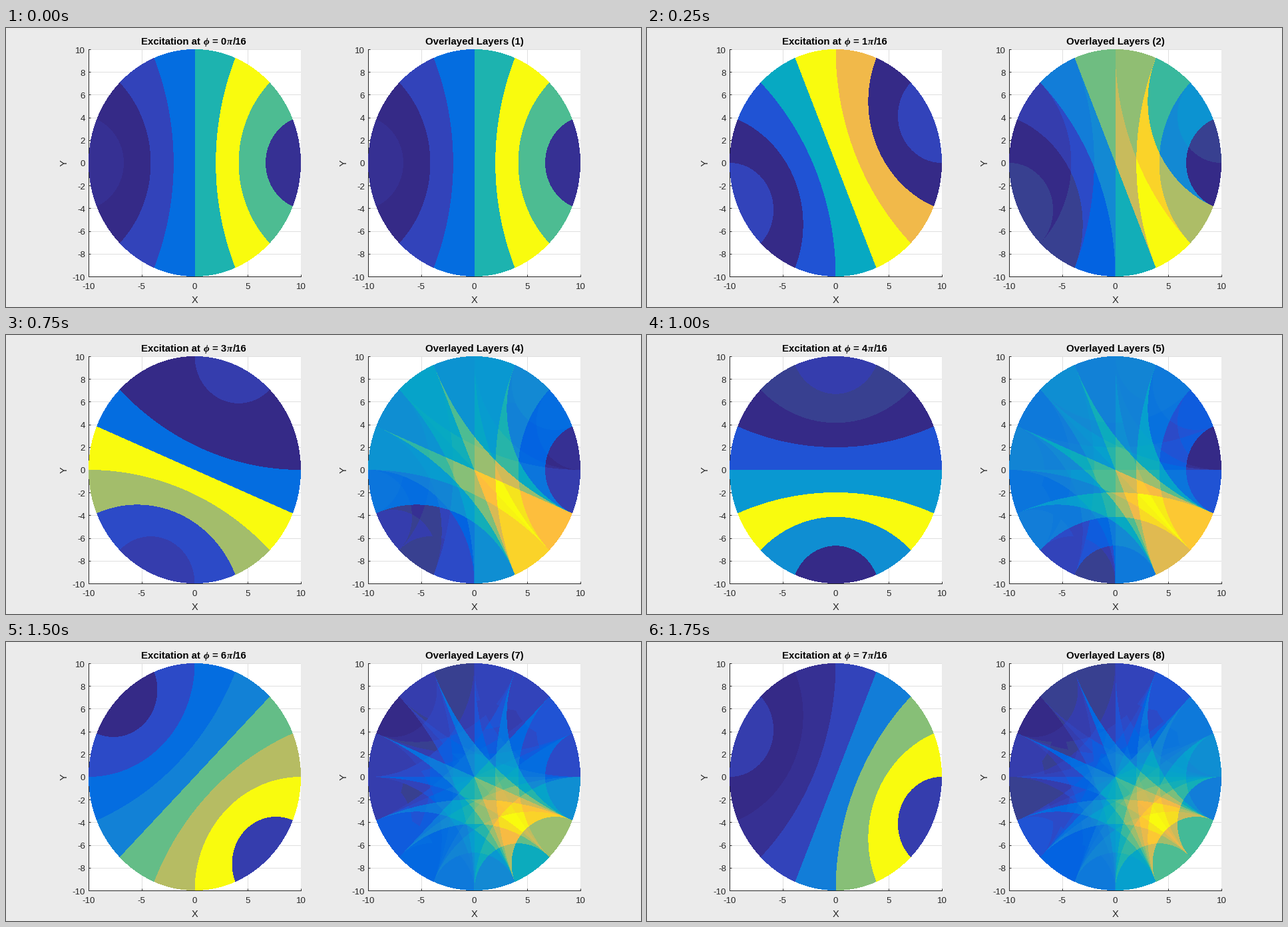
Animation, 954 px wide and 420 px high, one loop 3.5 s. Source, as a matplotlib script:

```python
import numpy as np
import matplotlib.pyplot as plt
from matplotlib.animation import FuncAnimation
from matplotlib.colors import to_rgb

W, H, DPI = 954, 420, 96
LEFTS = (124, 544)
TOP, AX_W, AX_H = 32, 319, 342
R = 10
INK = (0.15, 0.15, 0.15)

# Colour stops of a 64-step map
STOPS = {0: "#352a87", 1: "#363093", 2: "#384090", 3: "#353dad", 4: "#3243ba",
         5: "#2c4ac7", 6: "#2053d4", 7: "#0f5cdd", 8: "#0363e1", 10: "#046de0",
         14: "#127dd8", 17: "#1389d3", 20: "#0998d1", 22: "#06a0cd",
         25: "#07a9c2", 29: "#1db3af", 34: "#4dbc92", 39: "#87bf77",
         45: "#c0bc60", 51: "#f1b94a", 53: "#fdbe3d", 56: "#fcce2e",
         60: "#f5e41d", 63: "#f9fb0e"}
PALETTE = np.column_stack([np.interp(range(64), list(STOPS), channel)
                           for channel in zip(*map(to_rgb, STOPS.values()))])

# Level of each of the eight bands, counted from the driving electrode
LEVELS = np.array([
    [1, 34, 63, 29, 10, 4, 0, 1],
    [4, 0, 51, 63, 25, 6, 0, 4],
    [5, 0, 5, 63, 57, 14, 2, 5],
    [3, 0, 0, 10, 63, 42, 5, 3],
    [3, 2, 0, 6, 20, 63, 18, 0],
    [1, 0, 5, 10, 20, 42, 63, 1],
    [0, 5, 10, 15, 36, 44, 63, 3],
    [3, 0, 1, 4, 14, 39, 63, 3],
])
WEIGHTS = [1, 1, 1, 1, 1, 1, 1.8, 1.8]

xs = (np.arange(AX_W) + 0.5) / AX_W * 2 * R - R
ys = R - (np.arange(AX_H) + 0.5) / AX_H * 2 * R
Z = xs[None, :] + 1j * ys[:, None]
INSIDE = np.abs(Z) <= R


def layer(n):
    """Bands between circular equipotentials of two opposite electrodes."""
    pole = R * np.exp(1j * n * np.pi / 8)
    angle = 2 * np.arctan2(np.abs(Z - pole), np.abs(Z + pole))
    band = np.clip((angle / (np.pi / 8)).astype(int), 0, 7)
    return LEVELS[n][band].astype(float)


def colourise(field):
    lo, hi = field[INSIDE].min(), field[INSIDE].max()
    step = np.clip((field - lo) / (hi - lo) * 64, 0, 63).astype(int)
    return np.dstack([PALETTE[step], INSIDE])


layers = [layer(n) for n in range(8)]
totals = np.cumsum([w * f for w, f in zip(WEIGHTS, layers)], axis=0)
singles = [colourise(f) for f in layers]
overlays = [colourise(f) for f in totals]

plt.rcParams["font.family"] = "Liberation Sans"
fig = plt.figure(figsize=(W / DPI, H / DPI), dpi=DPI, facecolor="#ebebeb")


def label(x, y, text, px=13.33, ha="center", color=INK, **kw):
    return fig.text(x / W, 1 - y / H, text, fontsize=px * 72 / DPI, ha=ha,
                    va=kw.pop("va", "baseline"), color=color, **kw)


def title(x, text, ha="left", **kw):
    return label(x, 25, text, px=15, ha=ha, color="black", weight="bold", **kw)


def greek(x, letter):
    return title(x, letter, ha="center", style="italic",
                 family=["Liberation Serif", "DejaVu Serif"])


def panel(left):
    ax = fig.add_axes([left / W, 1 - (TOP + AX_H) / H, AX_W / W, AX_H / H])
    ax.set_axisbelow(True)
    image = ax.imshow(singles[0], extent=(-R, R, -R, R), aspect="auto",
                      interpolation="nearest", zorder=3)
    ax.set(xlim=(-R, R), ylim=(-R, R))
    ax.set_xticks(range(-10, 11, 5))
    ax.set_yticks(range(-10, 11, 2))
    ax.grid(color="#dfdfdf", linewidth=0.75)
    ax.tick_params(direction="in", length=2.4, width=0.75, color=INK,
                   labelbottom=False, labelleft=False)
    for side in ("top", "right"):
        ax.spines[side].set_visible(False)
    for side in ("bottom", "left"):
        ax.spines[side].set(color=INK, linewidth=0.75)
    for v in range(-10, 11, 5):
        label(left + (v + R) / (2 * R) * AX_W, 393, str(v))
    for v in range(-10, 11, 2):
        label(left - 5, TOP + (R - v) / (2 * R) * AX_H + 5.5, str(v), ha="right")
    label(left + AX_W / 2, 414, "X", px=14.67)
    label(left - 36.5, 203.5, "Y", px=14.67, rotation=90, va="center")
    return image


left_image, right_image = map(panel, LEFTS)

title(203, "Excitation at")
greek(301, "\u03d5")
count = title(310, "= 0")
greek(336, "\u03c0")
title(341, "/16")
overlay_title = title(704, "", ha="center")


def update(i):
    n = min(i, 7)
    left_image.set_data(singles[n])
    right_image.set_data(overlays[n])
    count.set_text(f"= {n}")
    overlay_title.set_text(f"Overlayed Layers ({n + 1})")
    return left_image, right_image, count, overlay_title


anim = FuncAnimation(fig, update, frames=14, interval=250, repeat=True,
                     repeat_delay=0, blit=False)
plt.show()
```
